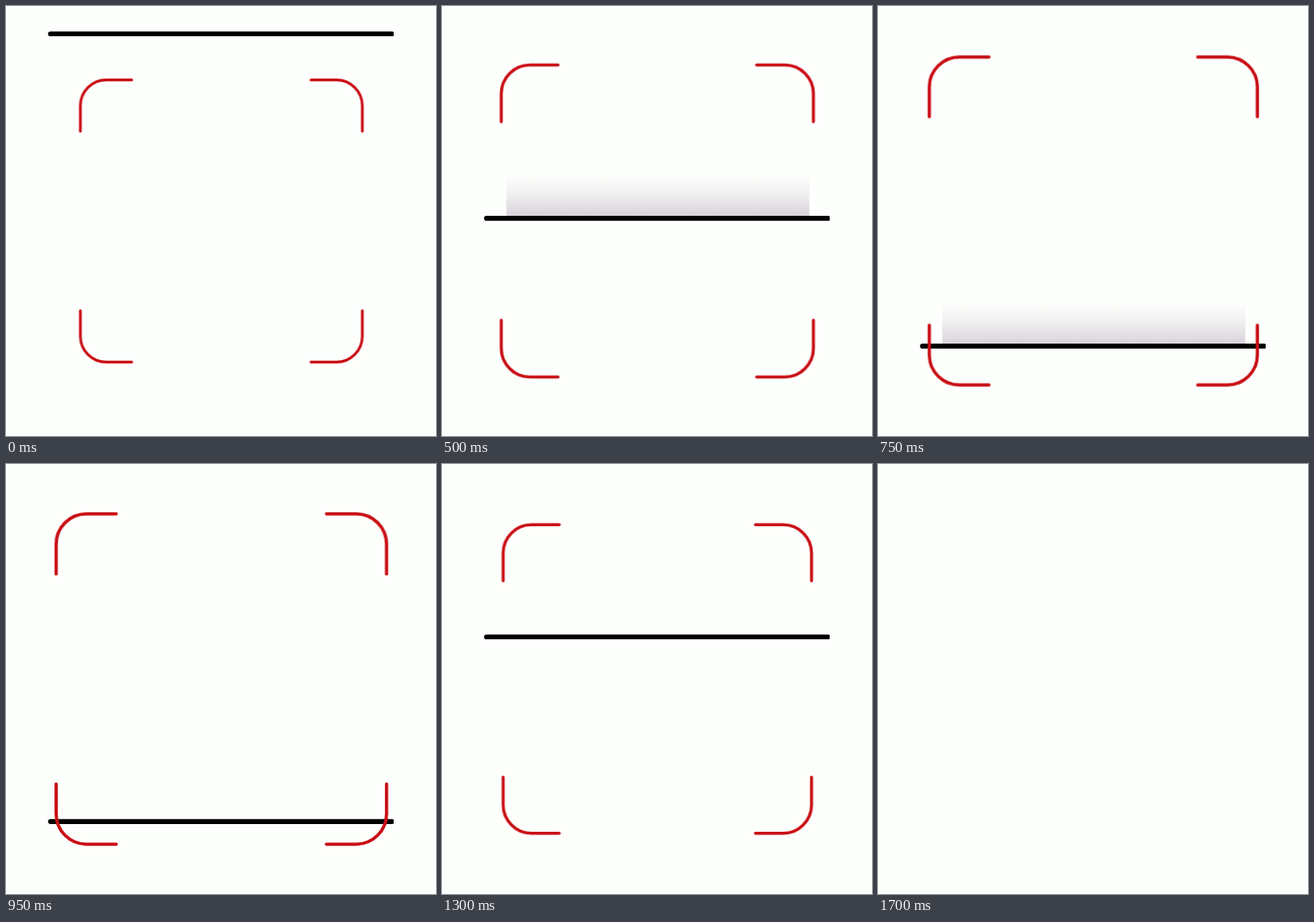
An HTML page that plays this animation: 498 by 498 pixels, repeating every 1.75 s.

```html
<!DOCTYPE html>
<html lang="en">
<head>
<meta charset="utf-8">
<title>Scanner</title>
<style>
  html, body { margin: 0; width: 100%; height: 100%; overflow: hidden; background: #fdfffc; }
  svg { display: block; width: 100%; height: 100%; }
</style>
</head>
<body>
<svg viewBox="0 0 498 498">
  <defs>
    <linearGradient id="fade" x1="0" y1="0" x2="0" y2="1">
      <stop offset="0" stop-color="#d6d0d8" stop-opacity="0"/>
      <stop offset="0.4" stop-color="#d6d0d8" stop-opacity="0.3"/>
      <stop offset="1" stop-color="#d6d0d8"/>
    </linearGradient>
    <filter id="soften" filterUnits="userSpaceOnUse" width="498" height="498" color-interpolation-filters="sRGB">
      <feGaussianBlur stdDeviation="0.6"/>
    </filter>
    <path id="corner" d="M-163.3 -103.9V-133.3A30 30 0 0 1 -133.3 -163.3H-103.9"/>
  </defs>
  <g id="scene" filter="url(#soften)">
    <g id="beam">
      <rect id="trail" x="74.5" y="-50" width="351" height="50" fill="url(#fade)"/>
      <path d="M51.5 0H447" stroke="#000" stroke-width="5.6" stroke-linecap="round"/>
    </g>
    <g id="frame" fill="none" stroke="#c90d14" stroke-width="3.2" stroke-linecap="round">
      <use href="#corner"/>
      <use href="#corner" transform="scale(-1 1)"/>
      <use href="#corner" transform="scale(1 -1)"/>
      <use href="#corner" transform="scale(-1)"/>
    </g>
  </g>
</svg>
<script>
const LOOP = 1750, STEP = 50, BLANK_AT = 1700;
const TOP = 32.2, RETURNED_AT = 1650;
const [scene, beam, trail, frame] =
  ["scene", "beam", "trail", "frame"].map(id => document.getElementById(id));

const clamp01 = x => Math.min(1, Math.max(0, x));

// Speeds up evenly from rest for the given time, then keeps its pace
function accelerate(t, time) {
  return t < time ? t * t / (2 * time) : t - time / 2;
}

// Leaves the top gently, bounces sharply at the bottom, settles at the top again
function beamY(t) {
  const down = 0.592 * accelerate(t, 278);
  const up = 0.611 * accelerate(Math.max(0, RETURNED_AT - t), 150);
  return TOP + Math.min(down, up);
}

// Grows and shrinks once per loop, halfway between a triangle and a cosine wave
function frameScale(t) {
  const u = 1 - Math.abs(2 * t / LOOP - 1);
  const wave = (1 - Math.cos(Math.PI * u)) / 2;
  return 1 + 0.181 * (u + wave) / 2;
}

// Visible on the way down only
function trailOpacity(t) {
  return clamp01(t / 200) * clamp01((900 - t) / 150);
}

function draw(now) {
  const t = Math.floor(now % LOOP / STEP) * STEP;
  scene.setAttribute("visibility", t < BLANK_AT ? "visible" : "hidden");
  beam.setAttribute("transform", `translate(0 ${beamY(t)})`);
  trail.setAttribute("opacity", trailOpacity(t));
  frame.setAttribute("transform", `translate(249.4 249) scale(${frameScale(t)})`);
}

const start = performance.now();
function tick() {
  draw(performance.now() - start);
  requestAnimationFrame(tick);
}
tick();
</script>
</body>
</html>
```
